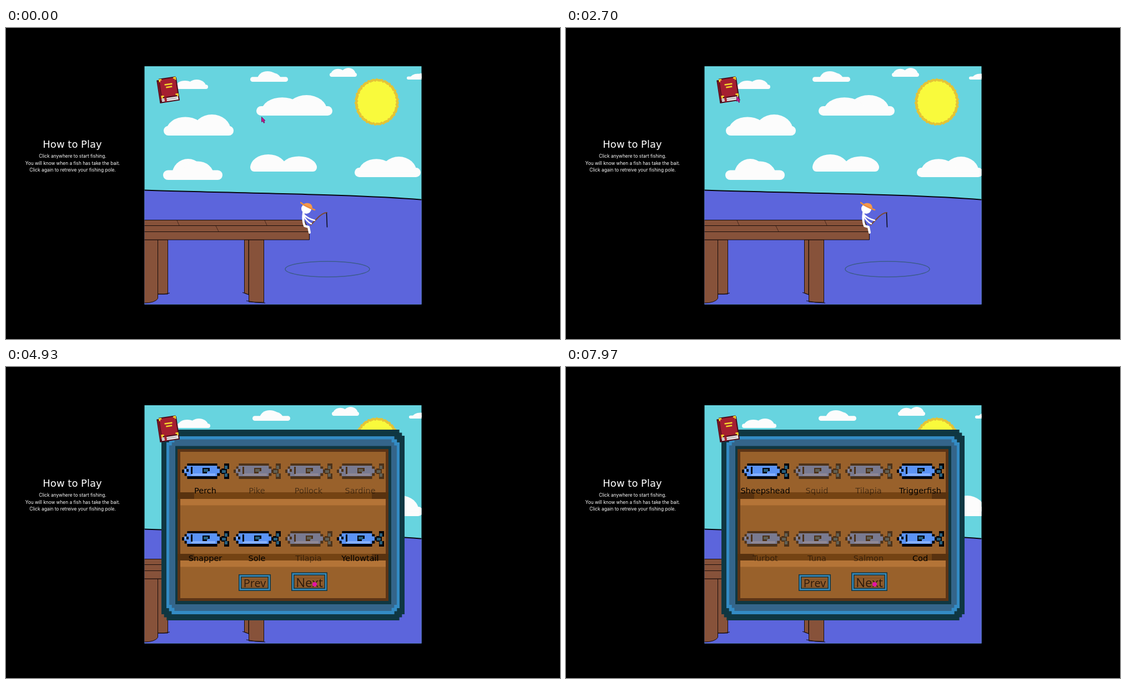
Recreate the animation shown at these times as an HTML page with a canvas. Size 998 px wide and 561 px high, loop 8 s.

```html
<!DOCTYPE html>
<html lang="en">
<head>
<meta charset="utf-8">
<title>Fishing</title>
<style>
  html, body { margin: 0; width: 100%; height: 100%; overflow: hidden; background: #000; }
  canvas { display: block; }
</style>
</head>
<body>
<canvas id="stage" width="998" height="561"></canvas>
<script>
const LOOP = 8000, OPEN_AT = 2830, HOVER_AT = 3760;
const ctx = document.getElementById('stage').getContext('2d');
const PIXEL_FONT = '"DejaVu Sans", sans-serif';
const TEXT_FONT = 'Inter, sans-serif';
const BUTTON_FONT = '"Open Sans", sans-serif';

const PAGES = [
  { from: 0, names: 'Anchovy,Barracuda,Carp,Catfish,Eel,Grouper,Herring,Mullet', caught: 'Eel' },
  { from: 4200, names: 'Perch,Pike,Pollock,Sardine,Snapper,Sole,Tilapia,Yellowtail', caught: 'Perch,Snapper,Sole,Yellowtail' },
  { from: 5400, names: 'Hake,Jack,Ling,Mahi Mahi,Monkfish,Moray Eel,Mullet,Parrotfish', caught: 'Jack,Mullet,Parrotfish' },
  { from: 6900, names: 'Sheepshead,Squid,Tilapia,Triggerfish,Turbot,Tuna,Salmon,Cod', caught: 'Sheepshead,Triggerfish,Cod' },
];

function rect(color, x, y, w, h, c = ctx) {
  c.fillStyle = color;
  c.fillRect(x, y, w, h);
}

// Rectangle whose corners are cut in pixel steps.
function steppedRect(color, x, y, w, h, steps, c = ctx) {
  for (let i = 0; i <= steps; i++) {
    const dx = (steps - i) * 4.7, dy = i * 5.5;
    rect(color, x + dx, y + dy, w - 2 * dx, h - 2 * dy, c);
  }
}

function shape(d, fill, stroke, width = 1) {
  const path = new Path2D(d);
  if (fill) { ctx.fillStyle = fill; ctx.fill(path); }
  if (stroke) { ctx.strokeStyle = stroke; ctx.lineWidth = width; ctx.stroke(path); }
}

function label(text, x, y, size, font, color) {
  ctx.font = `${size}px ${font}`;
  ctx.textAlign = 'center';
  ctx.fillStyle = color;
  ctx.fillText(text, x, y);
}

// A rounded bar with a main hump at a fraction of its width and a lower one opposite.
function cloud(left, right, bottom, top, peak) {
  const w = right - left, r = (bottom - top) * 0.23, base = bottom - r;
  ctx.fillStyle = '#fcfcfc';
  ctx.beginPath();
  ctx.roundRect(left, bottom - 2 * r, w, 2 * r, r);
  ctx.fill();
  for (const [at, height] of [[peak, 1], [1 - peak, 0.85]]) {
    ctx.beginPath();
    ctx.ellipse(left + w * at, base, w * 0.27, (base - top) * height, 0, Math.PI, 0);
    ctx.fill();
  }
}

function drawClouds() {
  cloud(302, 364, 110, 93, 0.67);
  cloud(440, 508, 97, 78, 0.46);
  cloud(583, 632, 88, 72, 0.69);
  cloud(722, 772, 93, 81, 0.6);
  cloud(451, 588, 158, 121, 0.66);
  cloud(284, 410, 194, 156, 0.69);
  cloud(283, 390, 274, 236, 0.42);
  cloud(440, 560, 259, 228, 0.27);
  cloud(628, 747, 269, 232, 0.67);
}

function roughDisc(x, y, rx, ry, color) {
  ctx.beginPath();
  for (let i = 0; i < 120; i++) {
    const a = i / 120 * Math.PI * 2;
    const jitter = Math.sin(i * 2.7) * Math.sin(i * 1.1) * 1.3;
    ctx.lineTo(x + (rx + jitter) * Math.cos(a), y + (ry + jitter) * Math.sin(a));
  }
  ctx.fillStyle = color;
  ctx.fill();
}

function drawDock() {
  const wood = '#87523a', ink = '#180d0b';
  shape('M273.5 382V480H291.5V382Z', wood, ink);
  shape('M429.5 382V478L437 481V382Z', wood, ink);
  shape('M249 382V496Q268 496 273.5 488V382Z', wood, ink);
  shape('M437.5 382V494L464.5 495V382Z', wood, ink);
  shape('M274 480Q285 481 295 478M426 477L437 481M433 492Q448 496 467 496', null, ink);
  shape('M249 346.5H537L546.5 367V382H249Z', wood, ink);
  shape('M249 356.5H541M249 367.5H546', null, ink);
  shape('M308 347l4 9M378 357l5 10M466 347l4 9', null, '#48281c');
}

function drawFisher() {
  ctx.lineCap = ctx.lineJoin = 'round';
  shape('M549 355L559 345Q570 333 578 333', null, '#7b4a32', 2);
  shape('M577.5 334L578.5 359', null, '#080812', 1.5);
  shape('M536 333Q534 347 538 357L545 359L547 369', null, '#fff', 4);
  shape('M537 337Q544 344 556 347M536 338Q541 349 550 353', null, '#fff', 2.5);
  shape('M541 326h.1', null, '#fff', 18);
  shape('M535 320Q537 315 545 316Q552 317 552 326Z', '#f5994b');
  shape('M531 315Q541 323 556 328', null, '#e88b3f', 2.5);
  ctx.lineCap = 'butt';
  ctx.lineJoin = 'miter';
}

function drawBook() {
  const dark = '#4b0b1a', red = '#a51f30', gold = '#f4d82a';
  ctx.save();
  ctx.translate(292, 111.5);
  ctx.rotate(-0.15);
  rect(dark, -18, -20, 36, 42);
  rect(dark, -14, -22, 31, 4);
  rect('#7c1524', -17, -17, 3, 34);
  rect(red, -13, -20, 29, 32);
  rect('#e9e3e3', -14, 14, 30, 6);
  rect('#a9a0a8', -14, 16, 27, 1.5);
  rect(red, -9, 13, 4, 8);
  for (const x of [-14, 12]) for (const y of [-21, 9]) {
    rect(gold, x, y, 5, 2.5);
    rect(gold, x < 0 ? x : x + 2.5, y, 2.5, 5);
  }
  rect(gold, -5, -11, 14, 2.5);
  rect(gold, -3, -6, 11, 2.5);
  ctx.restore();
}

function drawScene(t) {
  ctx.save();
  ctx.beginPath();
  ctx.rect(249.5, 69, 499, 429.5);
  ctx.clip();
  rect('#67d4df', 249, 69, 500, 430);
  roughDisc(668, 133.5, 39.5, 42, '#e4c337');
  roughDisc(668, 133.5, 34.5, 37.5, '#f9fa3c');
  ctx.save();
  ctx.translate(t < 2000 ? 0 : t < 5000 ? 4 : t < 7000 ? 9.5 : 15, 0);
  drawClouds();
  ctx.restore();
  shape('M246 292.5C400 298 620 299 752 310V502H246Z', '#5c65dc', '#05060c', 2);
  shape('M503 435a76 14 0 0 1 152 0a76 14 0 0 1-152 0', null, '#3d5c8c', 1.5);
  drawDock();
  drawFisher();
  ctx.restore();
}

function makeFish() {
  const sprite = document.createElement('canvas');
  sprite.width = 85;
  sprite.height = 28;
  const c = sprite.getContext('2d');
  const black = '#02040a', teal = '#285f7d', pale = '#86b0ff';
  const part = (...box) => rect(...box, c);
  steppedRect(black, 0, 0, 73, 28, 2, c);
  steppedRect('#5b93f5', 4, 4, 64, 19, 1, c);
  part(pale, 17, 18, 43, 4);
  part(pale, 5, 10, 7, 4);
  part(black, 8, 10, 4, 5);
  part(black, 16, 6, 3, 13);
  part(black, 37, 8, 13, 6);
  part(black, 37, 13, 8, 5);
  part(teal, 39, 10, 8, 5);
  for (const y of [0, 18]) part(black, 76, y, 9, 10);
  part(black, 71, 9, 10, 10);
  for (const y of [4, 18]) part(teal, 77, y, 5, 6);
  part(teal, 72, 12, 7, 5);
  return sprite;
}
const fish = makeFish();

function drawButton(text, x, bottom, scale) {
  const w = 58 * scale, h = 30 * scale, y = bottom - h;
  const inset = (color, d) => rect(color, x + d, y + d, w - 2 * d, h - 2 * d);
  inset('#123540', 0);
  inset('#378bbd', 1.5);
  inset('#123540', 4);
  inset('#8f5b2b', 5.5);
  for (const f of [0.3, 0.7]) rect('#7e4d22', x + 7, y + h * f, w - 14, 1);
  label(text, x + w / 2, bottom - 7.5, 20 * scale, BUTTON_FONT, '#2c1a0d');
}

function drawPanel(t) {
  const teal = '#0f3742';
  steppedRect(teal, 280, 113, 438, 344, 2);
  steppedRect('#338bc4', 289, 125, 420, 321, 2);
  steppedRect('#34658a', 294, 130.5, 410, 309.5, 2);
  rect(teal, 305, 142.5, 389, 285.5);
  rect('#5c3416', 309, 148, 380, 274);
  rect('#99612b', 314, 153, 370, 264);

  for (const y of [226, 337]) {
    rect('#744313', 309, y, 380, 12);
    for (const x of [309, 659]) rect('#58320f', x, y, 30, 12);
    rect('#b47437', 314, y + 12, 370, 11.5);
  }

  const page = PAGES.findLast(p => t >= p.from);
  const caught = page.caught.split(',');
  page.names.split(',').forEach((name, i) => {
    const x = 317 + i % 4 * 93, y = i < 4 ? 174 : 296;
    ctx.globalAlpha = caught.includes(name) ? 1 : 0.5;
    ctx.drawImage(fish, x, y);
    label(name, x + 42, y + 54, 14.5, PIXEL_FONT, '#000');
  });
  ctx.globalAlpha = 1;

  const hover = t >= HOVER_AT;
  drawButton('Prev', hover ? 419 : 423, 404, 1);
  drawButton('Next', hover ? 514 : 517, 404, hover ? 1.12 : 1);
}

// The pointer rests at each stop until its move begins.
const MOVES = [
  { start: 0, end: 970, x: 393, y: 195 },
  { start: 970, end: 1570, x: 350, y: 165 },
  { start: 2000, end: 2600, x: 307, y: 123 },
  { start: 2900, end: 3650, x: 548, y: 374 },
  { start: 3710, end: 3900, x: 552, y: 387 },
];

function pointerAt(t) {
  let x = 460, y = 160;
  for (const move of MOVES) {
    const u = Math.min(1, Math.max(0, (t - move.start) / (move.end - move.start)));
    const eased = u * u * (3 - 2 * u);
    x += (move.x - x) * eased;
    y += (move.y - y) * eased;
  }
  return [x, y];
}

function drawPointer(t) {
  ctx.save();
  ctx.translate(...pointerAt(t));
  if (t >= HOVER_AT) {
    shape('M0 5a4 4 0 0 1 8 0a4 4 0 0 1-8 0', '#e313a4');
  } else {
    shape('M.5 .5v9l2-1.5l2 3.5l1.5-1L4.5 7H7Z', '#c8128f', '#651052', 0.8);
  }
  ctx.restore();
}

function drawHelp() {
  label('How to Play', 119.5, 216, 18, PIXEL_FONT, '#fff');
  ['Click anywhere to start fishing.',
   'You will know when a fish has take the bait.',
   'Click again to retreive your fishing pole.',
  ].forEach((line, i) => label(line, 120, 234.3 + i * 12.5, 8.32, TEXT_FONT, '#fff'));
}

function frame(now) {
  const t = now % LOOP;
  rect('#000', 0, 0, 998, 561);
  drawHelp();
  drawScene(t);
  if (t >= OPEN_AT) drawPanel(t);
  drawBook();
  drawPointer(t);
  requestAnimationFrame(frame);
}
requestAnimationFrame(frame);
</script>
</body>
</html>
```
